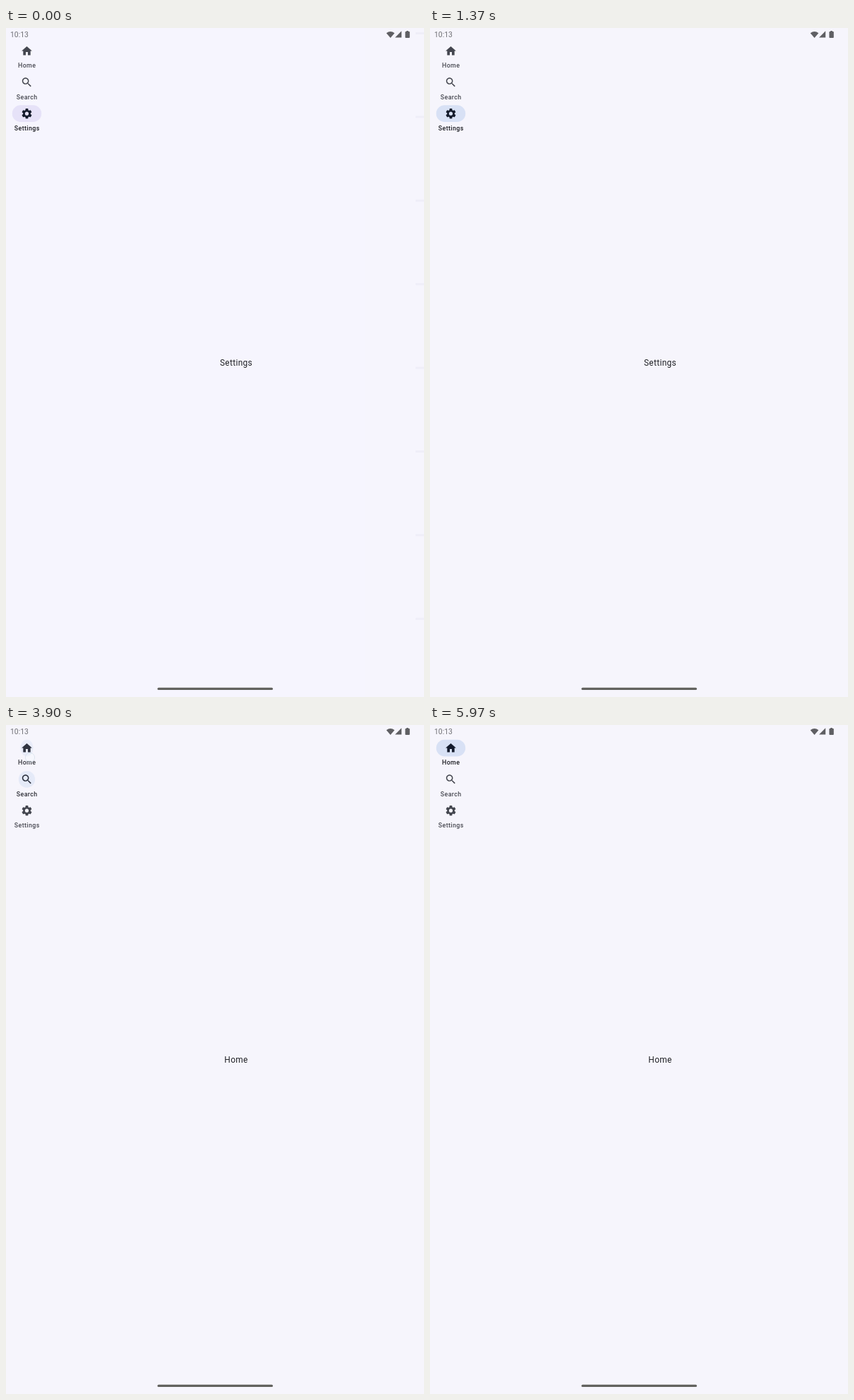
An HTML page for the animation above (6010 ms loop, 592 px wide and 947 px high).

```html
<!DOCTYPE html>
<html lang="en">
<head>
<meta charset="utf-8">
<title>Navigation rail</title>
<style>
  html, body { margin: 0; width: 100%; height: 100%; overflow: hidden; background: #f6f5fc; }
  svg { display: block; width: 592px; height: 947px; }
  text { font-family: Roboto, sans-serif; letter-spacing: .37px; }
  .label { font-size: 8.9px; font-weight: 500; text-anchor: middle; }
  .page { font-size: 11.85px; text-anchor: middle; fill: #1f2025; }
  .clock { font-size: 10.4px; letter-spacing: 0; fill: #717176; }
</style>
</head>
<body>
<svg id="stage" viewBox="0 0 592 947" xmlns="http://www.w3.org/2000/svg">
  <g id="intro"></g>
  <text class="clock" x="6" y="13">10:13</text>
  <g fill="#5f5f63">
    <path d="M538.7 7.2Q544.5 2.6 550.3 7.2L544.5 14Z"/>
    <path d="M551 13.6L560.2 4.3V13.6Z"/>
    <path d="M567.2 4.9V4H569.8V4.9H571Q571.8 4.9 571.8 5.7V13Q571.8 13.9 571 13.9H566.2Q565.4 13.9 565.4 13V5.7Q565.4 4.9 566.2 4.9Z"/>
  </g>
  <g id="rail"></g>
  <text class="page" id="page" x="326" y="477.7"></text>
  <rect x="214.5" y="933.8" width="163.5" height="3.2" rx="1.6" fill="#62625e"/>
  <circle id="cursor" r="6.6" fill="#f6fbff" fill-opacity=".6" stroke="#b9d0db" stroke-width=".8"/>
</svg>
<script>
const LOOP = 6010, SWITCH = 150;
const items = [
  { name: 'Home', icon: 'M10 20v-6h4v6h5v-8h3L12 3 2 12h3v8z' },
  { name: 'Search', icon: 'M15.5 14h-.79l-.28-.27C15.41 12.59 16 11.11 16 9.5 16 5.91 13.09 3 9.5 3S3 5.91 3 9.5 5.91 16 9.5 16c1.61 0 3.09-.59 4.23-1.57l.27.28v.79l5 4.99L20.49 19l-4.99-5zm-6 0C7.01 14 5 11.99 5 9.5S7.01 5 9.5 5 14 7.01 14 9.5 11.99 14 9.5 14z' },
  { name: 'Settings', icon: 'M19.14 12.94c.04-.3.06-.61.06-.94 0-.32-.02-.64-.07-.94l2.03-1.58c.18-.14.23-.41.12-.61l-1.92-3.32c-.12-.22-.37-.29-.59-.22l-2.39.96c-.5-.38-1.03-.7-1.62-.94l-.36-2.54c-.04-.24-.24-.41-.48-.41h-3.84c-.24 0-.43.17-.47.41l-.36 2.54c-.59.24-1.13.57-1.62.94l-2.39-.96c-.22-.08-.47 0-.59.22L2.74 8.87c-.12.21-.08.47.12.61l2.03 1.58c-.05.3-.09.63-.09.94s.02.64.07.94l-2.03 1.58c-.18.14-.23.41-.12.61l1.92 3.32c.12.22.37.29.59.22l2.39-.96c.5.38 1.03.7 1.62.94l.36 2.54c.05.24.24.41.48.41h3.84c.24 0 .44-.17.47-.41l.36-2.54c.59-.24 1.13-.56 1.62-.94l2.39.96c.22.08.47 0 .59-.22l1.92-3.32c.12-.22.07-.47-.12-.61l-2.01-1.58zM12 15.6c-1.98 0-3.6-1.62-3.6-3.6s1.62-3.6 3.6-3.6 3.6 1.62 3.6 3.6-1.62 3.6-3.6 3.6z' }
];
// Which item is selected, and since when
const selections = [{ at: -SWITCH, item: 2 }, { at: 3070, item: 1 }, { at: 3852, item: 0 }];
// Pointer path: time, x, y
const path = [[2420, 97, 590], [2500, 93.5, 565.5], [2900, 33, 91], [3280, 33, 91], [3700, 34, 46], [3960, 34, 46]];

const byId = id => document.getElementById(id);
const clamp = v => Math.min(1, Math.max(0, v));
const mix = (a, b, p) => a + (b - a) * p;
const mixColor = (a, b, p) => `rgb(${a.map((v, i) => Math.round(mix(v, b[i], p)))})`;

function add(parent, tag, attrs) {
  const el = document.createElementNS('http://www.w3.org/2000/svg', tag);
  for (const key in attrs) el.setAttribute(key, attrs[key]);
  return parent.appendChild(el);
}

// cubic-bezier(.4, 0, .2, 1)
function ease(x) {
  let lo = 0, hi = 1, s = .5;
  for (let i = 0; i < 20; i++) {
    s = (lo + hi) / 2;
    const bx = 1.2 * s * (1 - s) ** 2 + .6 * s * s * (1 - s) + s ** 3;
    if (bx < x) lo = s; else hi = s;
  }
  return s * s * (3 - 2 * s);
}

items.forEach((item, i) => {
  const y = 32.6 + i * 44.3, rail = byId('rail');
  item.pill = add(rail, 'rect', { y: y - 11.85, height: 23.7, rx: 11.85 });
  item.glyph = add(rail, 'path', { d: item.icon, transform: `translate(29.5 ${y}) scale(.74) translate(-12 -12)` });
  item.label = add(rail, 'text', { class: 'label', x: 29.7, y: y + 23.6 });
  item.label.textContent = item.name;
});

add(byId('intro'), 'rect', { width: 592, height: 947, fill: '#f6f5fe' });
for (let i = 0; i < 8; i++)
  add(byId('intro'), 'rect', { x: 580, y: 6 + i * 118.4, width: 12, height: 3, fill: '#efeef8' });

function selectedAmount(index, t) {
  let amount = 0;
  for (const { at, item } of selections)
    if (t >= at) amount = mix(amount, item === index ? 1 : 0, ease(clamp((t - at) / SWITCH)));
  return amount;
}

function drawCursor(t) {
  const cursor = byId('cursor'), first = path[0][0], last = path[path.length - 1][0];
  let k = 0;
  while (k < path.length - 2 && t >= path[k + 1][0]) k++;
  const [t0, x0, y0] = path[k], [t1, x1, y1] = path[k + 1];
  const p = clamp((t - t0) / (t1 - t0));
  cursor.setAttribute('cx', mix(x0, x1, p));
  cursor.setAttribute('cy', mix(y0, y1, p));
  const pressed = mix(1, .5, clamp((t - 3780) / 60));
  cursor.setAttribute('opacity', clamp((t - first) / 60) * clamp((last + 60 - t) / 60) * pressed);
}

function draw(t) {
  const settle = clamp(t / 120);
  byId('intro').setAttribute('opacity', 1 - settle);
  const pillColor = mixColor([230, 226, 248], [216, 225, 245], settle);
  items.forEach((item, i) => {
    const p = selectedAmount(i, t), width = 41.4 * p;
    item.pill.setAttribute('x', 29.5 - width / 2);
    item.pill.setAttribute('width', width);
    item.pill.setAttribute('fill', pillColor);
    item.pill.setAttribute('opacity', p);
    item.glyph.setAttribute('fill', mixColor([68, 70, 79], [20, 27, 44], p));
    item.label.setAttribute('fill', mixColor([72, 73, 81], [26, 27, 32], p));
  });
  const current = selections.filter(s => t >= s.at).pop();
  byId('page').textContent = items[current.item].name;
  drawCursor(t);
}

const start = performance.now();
function tick() {
  draw((performance.now() - start) % LOOP);
  requestAnimationFrame(tick);
}
tick();
</script>
</body>
</html>
```
